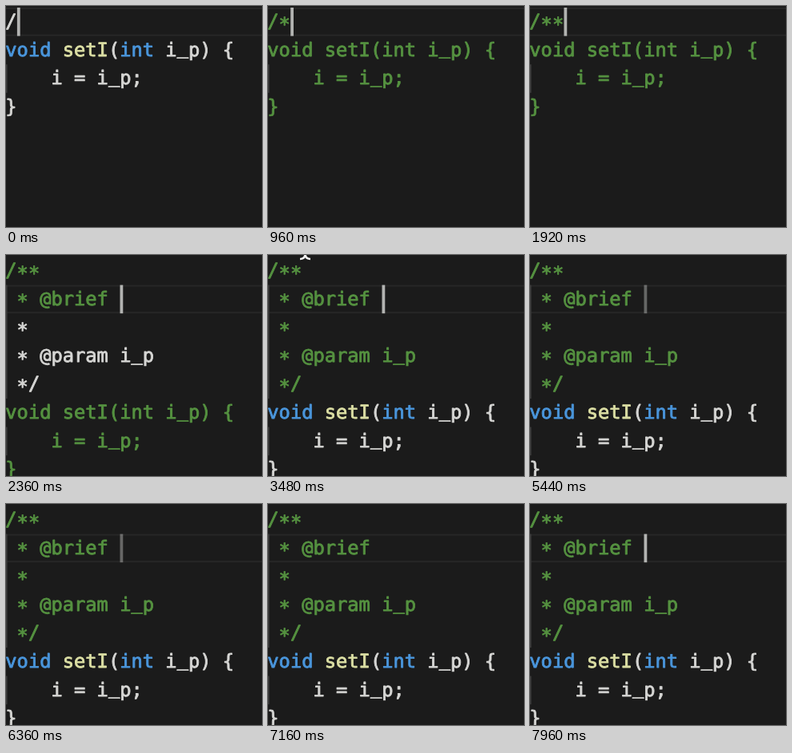
Write an HTML page with a canvas that moves like this. It is 320 by 277 pixels and loops after 8000 ms.

```html
<!DOCTYPE html>
<html lang="en">
<head>
<meta charset="utf-8">
<title>Doc comment</title>
<style>
html, body { margin: 0; width: 100%; height: 100%; overflow: hidden; background: #1b1b1b; }
canvas { display: block; width: 320px; height: 277px; }
</style>
</head>
<body>
<canvas id="stage" width="320" height="277"></canvas>
<script>
const ctx = document.getElementById('stage').getContext('2d');
const LOOP = 8000, CHAR = 14.29, LINE = 35.6, TOP = 2;
const BG = '#1b1b1b', TEXT = '#d6d6d4', GREEN = '#559240', BLUE = '#4a96dc', YELLOW = '#dcdfa4';

// Vertical offsets that centre the asterisk and lift the underscore
const SHIFT = { '*': 3.8, '_': -2.2 };

const CODE = [
  [['void', BLUE], [' '], ['setI', YELLOW], ['('], ['int', BLUE], [' i_p) {']],
  [['    i = i_p;']],
  [['}']]
];
const DOC = ['/**', ' * @brief ', ' *', ' * @param i_p', ' */'];

// Cursor fades: start, end, opacity afterwards
const FADES = [[3680, 4080, 0], [5240, 5640, 1], [6120, 6600, 0], [7600, 7960, 1]];

const lineY = row => TOP + row * LINE;

function drawLine(row, parts, tint) {
  let col = 0;
  for (const [text, color = TEXT] of parts) {
    ctx.fillStyle = ctx.strokeStyle = tint || color;
    for (const ch of text) {
      const x = col++ * CHAR - 0.7, y = lineY(row) + 25 + (SHIFT[ch] || 0);
      if (ch === ' ') continue;
      ctx.fillText(ch, x, y);
      ctx.strokeText(ch, x, y);
    }
  }
}

function drawHighlight(row) {
  ctx.fillStyle = '#272727';
  ctx.fillRect(0, lineY(row), 320, 2);
  ctx.fillRect(0, lineY(row + 1) - 2, 320, 2);
}

function drawGuide(row, count) {
  ctx.fillStyle = '#3c3c3c';
  ctx.fillRect(0, lineY(row), 1.6, LINE * count);
}

function cursorAlpha(t) {
  let alpha = 1;
  for (const [start, end, to] of FADES) {
    if (t < start) break;
    const p = Math.min(1, (t - start) / (end - start));
    alpha += (to - alpha) * p * p * (3 - 2 * p);
  }
  return alpha;
}

function drawCursor(row, col, alpha) {
  ctx.globalAlpha = alpha;
  ctx.fillStyle = '#b2b3b1';
  ctx.fillRect(col * CHAR - 0.4, lineY(row), 3.8, LINE);
  ctx.globalAlpha = 1;
}

function drawPointer() {
  ctx.beginPath();
  ctx.moveTo(40, 5);
  ctx.quadraticCurveTo(46.5, 5, 46.5, -2);
  ctx.quadraticCurveTo(46.5, 5, 53, 5);
  ctx.strokeStyle = '#f2f2f2';
  ctx.lineWidth = 2.5;
  ctx.stroke();
}

function draw(t) {
  const expanded = t >= 2200, settled = t >= 2400;
  const typed = t < 880 ? 1 : t < 1240 ? 2 : 3;
  const codeRow = expanded ? DOC.length : 1;
  const codeTint = t >= 960 && !settled ? GREEN : null;

  ctx.fillStyle = BG;
  ctx.fillRect(0, 0, 320, 277);
  drawHighlight(expanded ? 1 : 0);
  if (expanded) drawGuide(1, 4);
  drawGuide(codeRow + 1, 1);

  ctx.font = '23.74px "DejaVu Sans Mono", monospace';
  ctx.textRendering = 'geometricPrecision';
  ctx.lineWidth = 0.85;
  ctx.lineJoin = 'round';
  if (expanded) {
    DOC.forEach((text, i) => drawLine(i, [[text]], settled || i < 2 ? GREEN : TEXT));
  } else {
    drawLine(0, [[DOC[0].slice(0, typed)]], t >= 960 ? GREEN : TEXT);
  }
  CODE.forEach((parts, i) => drawLine(codeRow + i, parts, codeTint));

  if (expanded) drawCursor(1, 10, cursorAlpha(t));
  else drawCursor(0, typed, 1);
  if (t >= 3480 && t < 3520) drawPointer();
}

const began = performance.now();
function tick() {
  draw((performance.now() - began) % LOOP);
  requestAnimationFrame(tick);
}
tick();
</script>
</body>
</html>
```
